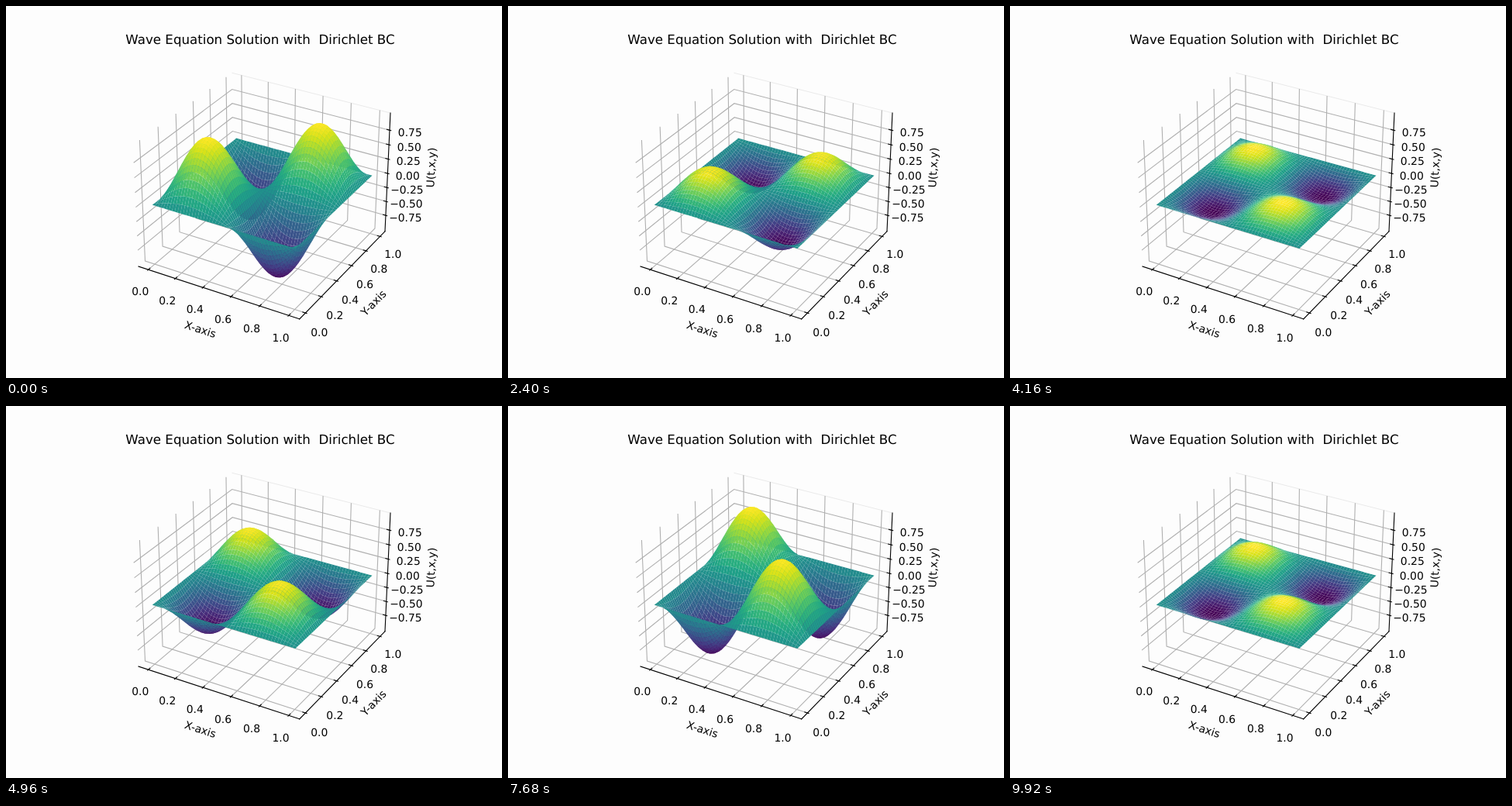
Animation, 640 px wide and 480 px high, one loop 10 s. Source, as an HTML page with a canvas:

```html
<!DOCTYPE html>
<html lang="en">
<head>
<meta charset="utf-8">
<title>Wave Equation Solution</title>
<style>
  html, body { margin: 0; width: 640px; height: 480px; overflow: hidden; background: #fdfdfd; }
  svg, canvas { position: absolute; left: 0; top: 0; }
  text {
    font: 13.89px "DejaVu Sans", sans-serif; text-anchor: middle;
    white-space: pre; text-rendering: geometricPrecision;
  }
  .title { font-size: 16.67px; }
  line, polyline { fill: none; stroke: #000; stroke-width: 1.11; }
  .grid { stroke: #b0b0b0; }
  .edge { stroke: #ebebeb; }
  .axis, .tick { stroke-linecap: square; }
</style>
</head>
<body>
<svg id="plot" width="640" height="480"></svg>
<canvas id="surface" width="640" height="480"></canvas>
<script>
const CELLS = 49;
const STEP_MS = 160, LOOP_MS = 10000;
const OMEGA = 2 * Math.PI * Math.SQRT2 * 0.008;   // phase per step
const BOX = 8 / 7, BOX_Z = 6 / 7;
const SIDE = BOX * 25 / 48, SIDE_Z = BOX_Z * 25 / 48;
const SCALE = 369.6 / 0.185, CX = 143.2 + 0.095 * SCALE, CY = 427.2 - 0.095 * SCALE;
const ROOT3 = Math.sqrt(3);

const mode = (x, y) => Math.sin(2 * Math.PI * x) * Math.sin(2 * Math.PI * y);
const Z_LIMIT = mode(12 / CELLS, 12 / CELLS);

// Perspective camera: elevation 30, azimuth -60, distance 10.
function project([x, y, z]) {
  const near = x * ROOT3 / 4 - y * 0.75 + z / 2;
  const k = SCALE / (10 - near);
  return [
    CX + k * (x * ROOT3 / 2 + y / 2),
    CY - k * (-x / 4 + y * ROOT3 / 4 + z * ROOT3 / 2),
    near
  ];
}

const flat = v => (v - 0.5) * BOX / 1.1;
const tall = v => v / Z_LIMIT * BOX_Z / 2;

// ---- axes, grid and labels ----
const plot = document.getElementById("plot");
const ASCENT = 10.95, MID_TO_BASE = 4;

function add(tag, attrs, content) {
  const el = document.createElementNS("http://www.w3.org/2000/svg", tag);
  for (const name in attrs) el.setAttribute(name, attrs[name]);
  if (content) el.textContent = content;
  plot.append(el);
}

function path(kind, ...points) {
  const list = points.map(p => project(p).slice(0, 2).map(v => v.toFixed(2)).join(","));
  add("polyline", { class: kind, points: list.join(" ") });
}

function tickLabel(point, content) {
  const [x, y] = project(point);
  add("text", { x: x.toFixed(1), y: Math.round(y + ASCENT) }, content);
}

function axisLabel(point, from, to, content) {
  const [x, y] = project(point), a = project(from), b = project(to);
  const angle = Math.atan2(b[1] - a[1], b[0] - a[0]) * 180 / Math.PI;
  add("text", { y: MID_TO_BASE, transform: `translate(${x + 1} ${y}) rotate(${angle})` }, content);
}

const S = SIDE, H = SIDE_Z;
const DELTA = BOX / 12, DELTA_Z = BOX_Z / 12;
const PER_POINT = 48 / (2 * 72 * 3.696);
const TICK_PAD = 11.5 * PER_POINT, LABEL_PAD = 25 * PER_POINT;
const OUT = 0.1 * DELTA, IN = 0.2 * DELTA;
const far = S + TICK_PAD * DELTA, low = -H - TICK_PAD * DELTA_Z;
const farther = S + LABEL_PAD * DELTA, lower = -H - LABEL_PAD * DELTA_Z;

const unitTicks = [0, 0.2, 0.4, 0.6, 0.8, 1];
const zTicks = [-0.75, -0.5, -0.25, 0, 0.25, 0.5, 0.75];

path("edge", [-S, S, H], [S, S, H]);
for (const t of unitTicks) {
  const v = flat(t);
  path("grid", [v, -S, -H], [v, S, -H], [v, S, H]);
  path("grid", [S, v, -H], [-S, v, -H], [-S, v, H]);
}
for (const t of zTicks) path("grid", [-S, -S, tall(t)], [-S, S, tall(t)], [S, S, tall(t)]);

const left = [-S, -S, -H], front = [S, -S, -H], right = [S, S, -H], peakEnd = [S, S, H];
path("axis", left, front);
path("axis", front, right);
path("axis", right, peakEnd);

for (const t of unitTicks) {
  const v = flat(t);
  path("tick", [v, -S - OUT, -H], [v, -S + IN, -H]);
  path("tick", [S + OUT, v, -H], [S - IN, v, -H]);
  tickLabel([v, -far, low], t.toFixed(1));
  tickLabel([far, v, low], t.toFixed(1));
}
for (const t of zTicks) {
  const v = tall(t);
  path("tick", [S + OUT, S, v], [S - IN, S, v]);
  tickLabel([far, far, v], t.toFixed(2).replace("-", "\u2212"));
}

axisLabel([0, -farther, lower], left, front, "X-axis");
axisLabel([farther, 0, lower], front, right, "Y-axis");
axisLabel([farther, farther, 0], right, peakEnd, "U(t,x,y)");
add("text", { class: "title", x: 328, y: 49 }, "Wave Equation Solution with  Dirichlet BC");

// ---- surface ----
const ctx = document.getElementById("surface").getContext("2d");

const VIRIDIS = ("440154 48186a 472d7b 424086 3b528b 33638d 2c728e 26828e 21918c " +
  "1fa088 28ae80 3fbc73 5ec962 84d44b addc30 d8e219 fde725").split(" ")
  .map(hex => [0, 2, 4].map(i => parseInt(hex.slice(i, i + 2), 16)));

function viridis(t) {
  const s = Math.min(Math.max(t, 0), 1) * (VIRIDIS.length - 1);
  const i = Math.min(Math.floor(s), VIRIDIS.length - 2);
  const rgb = VIRIDIS[i].map((c, n) => Math.round(c + (VIRIDIS[i + 1][n] - c) * (s - i)));
  return `rgb(${rgb})`;
}

const ROW = CELLS + 1;
const nodes = [], cells = [];
for (let j = 0; j < ROW; j++)
  for (let i = 0; i < ROW; i++) {
    const x = i / CELLS, y = j / CELLS;
    nodes.push({ x: flat(x), y: flat(y), u: mode(x, y) });
  }
for (let j = 0; j < CELLS; j++)
  for (let i = 0; i < CELLS; i++) {
    const n = j * ROW + i;
    const corners = [n, n + 1, n + ROW + 1, n + ROW];
    cells.push({ corners, mean: corners.reduce((sum, c) => sum + nodes[c].u, 0) / 4 });
  }
const peak = Math.max(...cells.map(c => c.mean));
for (const c of cells) {
  c.up = viridis(0.5 + c.mean / peak / 2);
  c.down = viridis(0.5 - c.mean / peak / 2);
}

function drawSurface(amp) {
  const pts = nodes.map(n => project([n.x, n.y, tall(n.u * amp)]));
  for (const c of cells) c.near = c.corners.reduce((sum, n) => sum + pts[n][2], 0);
  cells.sort((a, b) => a.near - b.near);
  ctx.clearRect(0, 0, 640, 480);
  for (const c of cells) {
    ctx.fillStyle = amp > 0 ? c.up : c.down;
    ctx.beginPath();
    for (const n of c.corners) ctx.lineTo(pts[n][0], pts[n][1]);
    ctx.closePath();
    ctx.fill();
  }
}

const start = performance.now();
let shown = -1;
function tick() {
  const step = Math.floor((performance.now() - start) % LOOP_MS / STEP_MS);
  if (step !== shown) {
    shown = step;
    drawSurface(Math.cos(OMEGA * step));
  }
  requestAnimationFrame(tick);
}
tick();
</script>
</body>
</html>
```
